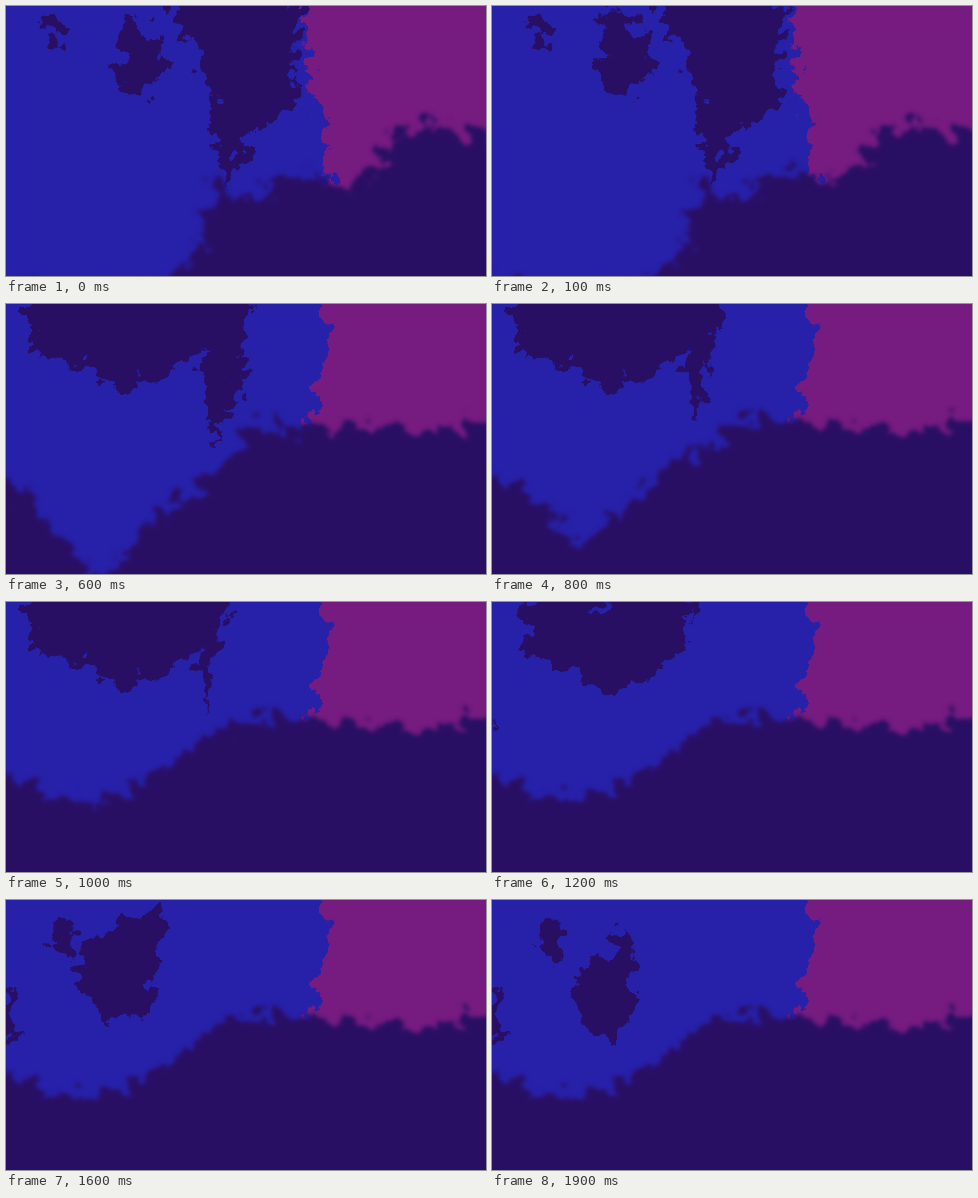
An HTML page that plays this animation: 480 by 270 pixels, repeating every 2 s.

```html
<!DOCTYPE html>
<html lang="en">
<head>
<meta charset="utf-8">
<title>Drifting colour clouds</title>
<style>
  html, body { margin: 0; width: 100%; height: 100%; overflow: hidden; background: #290f64; }
  svg { display: block; width: 100vw; height: 100vh; }
  .blue { fill: #2720a9; }
  .dark { fill: #290f64; }
  .magenta { fill: #761b80; }
</style>
</head>
<body>
<svg viewBox="0 0 480 270" preserveAspectRatio="none">
  <defs>
    <filter id="ragged" filterUnits="userSpaceOnUse" x="-40" y="-40" width="560" height="350" color-interpolation-filters="sRGB">
      <feTurbulence type="fractalNoise" baseFrequency=".055" numOctaves="5" seed="8"/>
      <feDisplacementMap in="SourceGraphic" scale="42" xChannelSelector="R" yChannelSelector="G"/>
      <feGaussianBlur stdDeviation=".7"/>
    </filter>
    <filter id="misty" filterUnits="userSpaceOnUse" x="-40" y="-40" width="560" height="350" color-interpolation-filters="sRGB">
      <feTurbulence type="fractalNoise" baseFrequency=".06" numOctaves="5" seed="3"/>
      <feDisplacementMap in="SourceGraphic" scale="46" xChannelSelector="R" yChannelSelector="G"/>
      <feGaussianBlur stdDeviation="2"/>
    </filter>
  </defs>
  <g filter="url(#ragged)">
    <rect class="blue" x="-60" y="-60" width="600" height="400"/>
    <path class="dark" id="canopy"/>
    <path class="dark" id="channel"/>
    <ellipse class="dark" id="islet"/>
    <ellipse class="dark" id="bank"/>
    <ellipse class="blue" id="gap"/>
    <path class="magenta" id="glow"/>
  </g>
  <path class="dark" id="ground" filter="url(#misty)"/>
</svg>
<script>
const LOOP = 2000, STEP = 100;

// Crest of the ground: x, first height, last height, start and end of the rise
const crest = [
  [0, 276, 176, 0, 600],
  [40, 282, 190, 200, 800],
  [90, 285, 198, 500, 1100],
  [145, 282, 176, 100, 1000],
  [186, 258, 145, 0, 1000],
  [210, 178, 122, 400, 1200],
  [245, 192, 116, 100, 700],
  [300, 170, 119, 0, 800],
  [345, 178, 123, 0, 500],
  [415, 114, 127, 0, 800],
  [480, 134, 116, 0, 1000]
];

// Outlines as x, y pairs, clockwise from the top left
const cloudSmall = [112, 8, 132, 8, 152, 38, 165, 60, 150, 75, 140, 98, 110, 70, 116, 45];
const cloudWide = [25, -40, 212, -40, 196, 38, 186, 56, 152, 76, 110, 82, 66, 55, 25, 52];
const cloudLow = [122, 50, 137, 18, 141, 60, 142, 98, 124, 140, 104, 132, 76, 102, 84, 72];
const channelOpen = [140, -40, 292, -40, 290, 70, 295, 98, 248, 125, 222, 182, 206, 125, 210, 85];
const channelShut = [196, -40, 228, -40, 212, 30, 207, 75, 204, 105, 203, 118, 196, 75, 190, 40];

const el = id => document.getElementById(id);
const mix = (a, b, k) => a + (b - a) * k;
const mixAll = (a, b, k) => a.map((v, n) => mix(v, b[n], k));

function ease(time, start, end) {
  const k = Math.min(1, Math.max(0, (time - start) / (end - start)));
  return k * k * (3 - 2 * k);
}

const setPath = (id, points) => el(id).setAttribute('d', `M${points.join(' ')}Z`);

function setEllipse(id, ...values) {
  ['cx', 'cy', 'rx', 'ry'].forEach((name, n) => el(id).setAttribute(name, values[n]));
}

function draw(time) {
  const tops = crest.flatMap(([x, from, to, start, end]) => [x, mix(from, to, ease(time, start, end))]);
  setPath('ground', [-60, tops[1], ...tops, 540, tops.at(-1), 540, 340, -60, 340]);

  const lean = ease(time, 0, 600);
  setPath('glow', [mix(288, 326, lean), -20, mix(320, 302, lean), 150, 330, 340, 540, 340, 540, -60]);

  const grown = mixAll(cloudSmall, cloudWide, ease(time, 0, 600));
  setPath('canopy', mixAll(grown, cloudLow, ease(time, 1000, 1900)));
  setPath('channel', mixAll(channelOpen, channelShut, ease(time, 0, 1000)));
  // The closed channel fades into the cloud's edge
  el('channel').setAttribute('transform', `translate(0 ${-180 * ease(time, 1000, 1400)})`);

  const drift = time / LOOP;
  setEllipse('islet', mix(48, 60, drift), mix(23, 38, drift), 14, mix(10, 20, drift));
  const late = ease(time, 1000, 1600);
  setEllipse('gap', 105, 5, 32 * late, 18 * late);
  setEllipse('bank', 0, 120, 8 * late, 28 * late);
}

let shown = -1;
function tick() {
  const time = Math.floor(performance.now() % LOOP / STEP) * STEP;
  if (time !== shown) draw(shown = time);
  requestAnimationFrame(tick);
}
tick();
</script>
</body>
</html>
```
